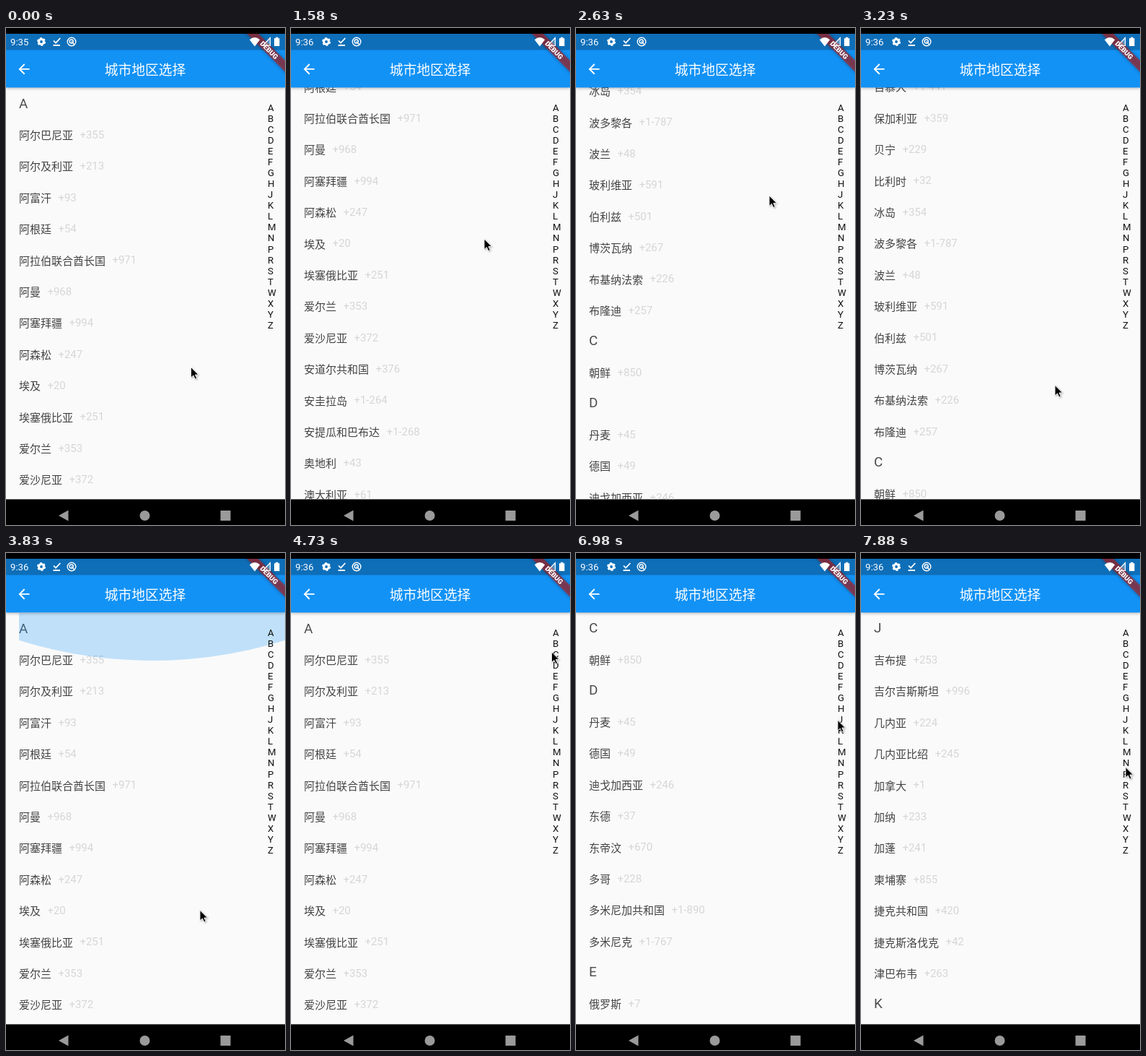
An HTML page that plays this animation: 387x688 px, repeating every 8 s.

```html
<!DOCTYPE html>
<html lang="zh-CN">
<head>
<meta charset="utf-8">
<title>城市地区选择</title>
<style>
  html, body { margin: 0; width: 100%; height: 100%; overflow: hidden; background: #000; }
  #stage { display: block; width: 387px; height: 688px; }
  text { font-family: Roboto, sans-serif; white-space: pre; }
  .name, .title { font-family: "Noto Sans CJK SC", "Noto Sans CJK", sans-serif; }
  .title { font-size: 18.8px; fill: #fff; text-anchor: middle; }
  .name { font-size: 15px; fill: #444; }
  .code { font-size: 15px; fill: #d6d6d6; }
  .head { font-size: 18.8px; fill: #4c4c4c; }
  .index { font-size: 13.2px; fill: #111; }
  .clock { font-size: 13.2px; fill: #fff; }
  .debug { font-size: 9.6px; font-weight: 900; fill: #fff; text-anchor: middle; }
  .bar { filter: drop-shadow(0 1.5px 2px rgba(0, 0, 0, .3)); }
  .ribbon { filter: drop-shadow(0 0 2.5px rgba(0, 0, 0, .5)); }
  #cursor { filter: drop-shadow(1px 1px 1px rgba(0, 0, 0, .3)); }
</style>
</head>
<body>
<svg id="stage" viewBox="0 0 387 688">
  <rect width="387" height="688"/>
  <rect y="82" width="387" height="570.4" fill="#fafafa"/>
  <svg y="82" width="387" height="570.4" viewBox="0 82 387 570.4" overflow="hidden"><g id="list"></g></svg>
  <svg x="18" y="83" width="369" height="569" overflow="hidden">
    <ellipse id="glow" cx="184.5" rx="553.5" fill="#2196f3"/>
  </svg>
  <g id="letters"></g>

  <svg y="8" width="387" height="90" viewBox="0 8 387 90" overflow="hidden">
    <rect class="bar" y="8" width="387" height="74.4" fill="#1292f5"/>
    <rect y="8" width="387" height="22.5" fill="#0e6eb8"/>
    <text class="title" x="193" y="65.2">城市地区选择</text>
    <path transform="translate(13.7 45.6) scale(.942)" fill="#fff"
          d="M20 11H7.83l5.59-5.59L12 4l-8 8 8 8 1.41-1.41L7.83 13H20z"/>
    <g transform="translate(387 8) rotate(45)">
      <rect class="ribbon" x="-60" y="26" width="120" height="11.3" fill="#b71c1c" fill-opacity=".63"/>
      <text class="debug" x=".5" y="35">DEBUG</text>
    </g>
    <text id="clock" class="clock" x="6" y="24.2"></text>
    <g fill="none" stroke="#fff">
      <circle cx="49" cy="19" r="3.4" stroke-width="3"/>
      <circle cx="49" cy="19" r="5" stroke-width="2" stroke-dasharray="2.8 2.436"/>
      <path d="M66 17.5l3 3.2 6.300-6.700M65.500 24h9.500" stroke-width="1.8"/>
      <circle cx="91" cy="19" r="5.8" stroke-width="1.4"/>
      <circle cx="90.700" cy="18.600" r="2.6" stroke-width="1.4"/>
      <path d="M90.500 18.500l5 5" stroke-width="1.4"/>
    </g>
    <g fill="#fff">
      <path d="M345 25.500L337.800 16.200Q345 10 352.200 16.200Z"/>
      <path d="M366.500 13.500V24.500H356Z" fill-opacity=".3" stroke="#fff" stroke-width="1.2"/>
      <path d="M372 14.200h2v-1.400h3.400v1.400h2V25H372Z"/>
    </g>
  </svg>

  <g fill="#9a9a9a">
    <path d="M73 675L86.500 667.500V682.500Z"/>
    <circle cx="192.500" cy="675" r="7"/>
    <rect x="297.500" y="668" width="14" height="14"/>
  </g>
  <path id="cursor" d="M0 0V14.500L3.400 11.400L5.800 16.600L8.200 15.500L5.900 10.500H10.500Z" stroke="#fff" stroke-width=".9"/>
</svg>

<script>
const LOOP = 8000, TICK = 150, PHASE = 80;
const LIST_TOP = 83, HEAD_H = 42.6, ROW_H = 43.4;
const $ = id => document.getElementById(id);

const sections = {
  A: '阿尔巴尼亚 355,阿尔及利亚 213,阿富汗 93,阿根廷 54,阿拉伯联合酋长国 971,阿曼 968,阿塞拜疆 994,阿森松 247,埃及 20,埃塞俄比亚 251,爱尔兰 353,爱沙尼亚 372,安道尔共和国 376,安圭拉岛 1-264,安提瓜和巴布达 1-268,奥地利 43,澳大利亚 61,澳门 853',
  B: '巴巴多斯 1-246,巴布亚新几内亚 675,巴哈马 1-242,巴基斯坦 92,巴拉圭 595,巴林 973,巴拿马 507,巴西 55,白俄罗斯 375,百慕大 1-441,保加利亚 359,贝宁 229,比利时 32,冰岛 354,波多黎各 1-787,波兰 48,玻利维亚 591,伯利兹 501,博茨瓦纳 267,布基纳法索 226,布隆迪 257',
  C: '朝鲜 850',
  D: '丹麦 45,德国 49,迪戈加西亚 246,东德 37,东帝汶 670,多哥 228,多米尼加共和国 1-890,多米尼克 1-767',
  E: '俄罗斯 7',
  J: '吉布提 253,吉尔吉斯斯坦 996,几内亚 224,几内亚比绍 245,加拿大 1,加纳 233,加蓬 241,柬埔寨 855,捷克共和国 420,捷克斯洛伐克 42,津巴布韦 263',
  K: ''
};

function addText(parent, cls, x, y, content) {
  const node = document.createElementNS('http://www.w3.org/2000/svg', 'text');
  node.setAttribute('class', cls);
  node.setAttribute('x', x);
  node.setAttribute('y', y);
  node.textContent = content;
  parent.append(node);
}

const sectionTop = {};
let y = LIST_TOP;
for (const [letter, rows] of Object.entries(sections)) {
  sectionTop[letter] = y - LIST_TOP;
  addText($('list'), 'head', 18, y + 27.5, letter);
  y += HEAD_H;
  for (const row of rows.split(',').filter(Boolean)) {
    const [name, code] = row.split(' ');
    addText($('list'), 'name', 18, y + 28.4, name);
    addText($('list'), 'code', 27.4 + 15 * name.length, y + 27.2, '+' + code);
    y += ROW_H;
  }
}
[...'ABCDEFGHJKLMNPRSTWXYZ'].forEach((c, i) =>
  addText($('letters'), 'index', 363, 114.6 + i * 15.07, c));

const ramp = (t, from, to) => Math.min(1, Math.max(0, (t - from) / (to - from)));
const easeIn = p => p * p;
const easeOut = p => 1 - (1 - p) ** 2;

// Drag up, fling onwards, fling back to the top, then two jumps by letter.
function scrollAt(t) {
  if (t >= 7280) return sectionTop.J;
  if (t >= 5630) return sectionTop.C;
  const drag = 261, fling = 1264;
  return drag * ramp(t, 1190, 1708)
    + fling * easeOut(ramp(t, 1708, 2930))
    - (drag + fling) * easeIn(ramp(t, 2930, 3680));
}

const glowAt = t => ramp(t, 3600, 3830) * (1 - easeOut(ramp(t, 3830, 4280)));

// Places where the pointer rests or turns: [ms, x, y]
const pointerKeys = [
  [380, 256.5, 469.5], [980, 261, 475], [1190, 268, 475], [1708, 268, 232],
  [2930, 268, 232], [3230, 269, 494.5], [3980, 269, 494.5], [4280, 321, 305],
  [4730, 361.5, 137], [5780, 362, 140], [6830, 363, 231.5], [7580, 363, 231.5],
  [7880, 367, 296.5]
];

function pointerAt(t) {
  let [, ...pos] = pointerKeys[0];
  pointerKeys.slice(1).forEach(([end, ...to], i) => {
    const p = ramp(t, pointerKeys[i][0], end);
    if (p > 0) pos = pos.map((_, k) => pointerKeys[i][k + 1] + (to[k] - pointerKeys[i][k + 1]) * p);
  });
  return pos;
}

function draw(now) {
  const t = Math.floor((now - PHASE) / TICK) * TICK + PHASE;
  $('list').setAttribute('transform', `translate(0 ${-scrollAt(t)})`);

  const glow = glowAt(t), size = .89 * glow;
  $('glow').setAttribute('cy', -479.4 * size);
  $('glow').setAttribute('ry', 553.5 * size);
  $('glow').setAttribute('opacity', .27 * glow);

  $('cursor').setAttribute('transform', `translate(${pointerAt(t)})`);
  $('clock').textContent = t < 830 ? '9:35' : '9:36';
}

const start = performance.now();
function tick() {
  draw((performance.now() - start) % LOOP);
  requestAnimationFrame(tick);
}
tick();
</script>
</body>
</html>
```
